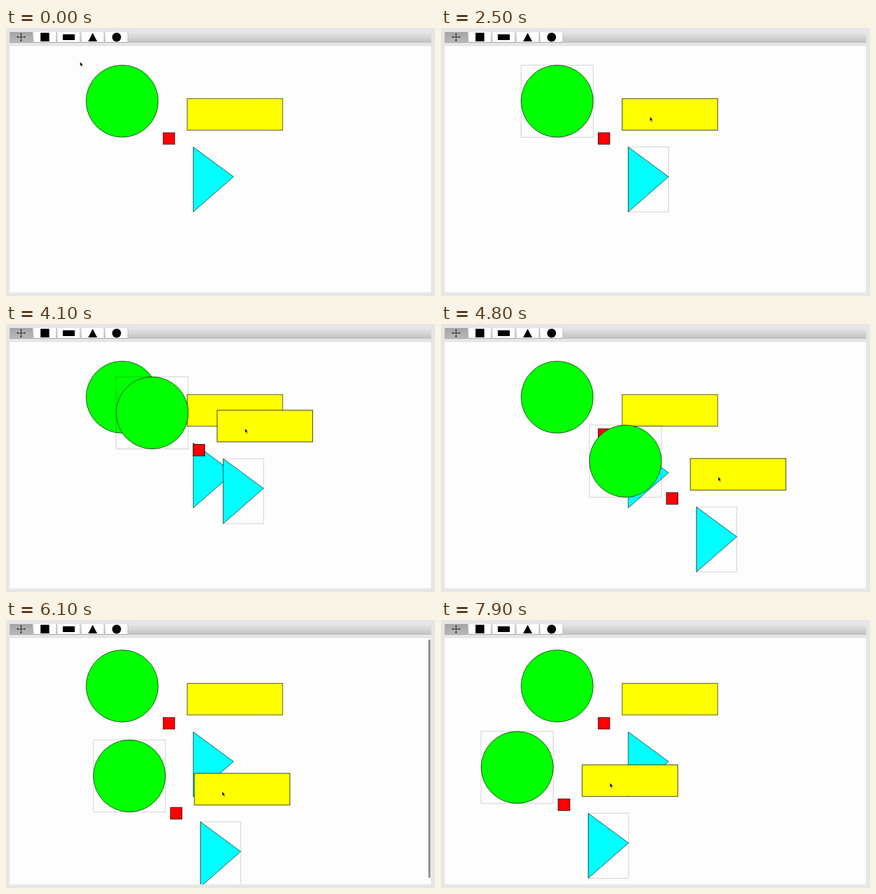
Recreate the animation shown at these times as an HTML page. Size 640 px wide and 400 px high, loop 8 s.

```html
<!DOCTYPE html>
<html lang="en">
<head>
<meta charset="utf-8">
<title>Shape editor</title>
<style>
  html, body { margin: 0; width: 100%; height: 100%; overflow: hidden; background: #e6e6e6; }
  svg { display: block; width: 640px; height: 400px; }
  .shape { stroke: #000; stroke-opacity: .75; stroke-width: .85; }
  .box { fill: none; stroke: #000; stroke-opacity: .2; stroke-width: .9; }
</style>
</head>
<body>
<svg viewBox="0 0 640 400">
  <defs>
    <linearGradient id="bar" x2="0" y2="1">
      <stop offset="0" stop-color="#e8e8e8"/>
      <stop offset="1" stop-color="#c0c0c0"/>
    </linearGradient>
    <linearGradient id="down" x2="0" y2="1">
      <stop offset="0" stop-color="#a4a4a4"/>
      <stop offset="1" stop-color="#b8b8b8"/>
    </linearGradient>
    <clipPath id="view"><rect x="5.5" y="27" width="628.5" height="367.5"/></clipPath>
  </defs>

  <rect width="640" height="400" fill="#e6e6e6"/>
  <rect x="5" y="5.5" width="629.5" height="16.5" fill="url(#bar)"/>
  <g id="buttons"></g>
  <path d="M16.5 13.5h12M22.5 8v12" stroke="#222" stroke-width=".9"/>
  <path d="M16 13.5l2-1.5v3zM29 13.5l-2-1.5v3zM22.5 7.5l-1.5 2h3zM22.5 20l-1.5-2h3z" fill="#222"/>
  <rect x="51.5" y="7.2" width="13" height="12.8"/>
  <rect x="84.8" y="9.4" width="17.8" height="8.6"/>
  <path d="M129.3 7.3l6.7 12.7h-13.4z"/>
  <circle cx="165" cy="13.7" r="6.7"/>

  <rect x="5.5" y="27" width="628.5" height="367.5" fill="#fdfdfd"/>
  <g clip-path="url(#view)">
    <g id="base"></g>
    <g id="copy"></g>
    <rect id="marquee" class="box"/>
    <rect id="thumb" x="630.2" y="29" width="3" height="356" rx="1.5" fill="#666"/>
  </g>
  <path id="cursor" d="M0 0V6.2L1.5 5L2.6 7.6L3.7 7.1L2.6 4.6H4.3Z" fill="#000" stroke="#fff" stroke-width=".3"/>
</svg>
<script>
const LOOP = 8000, STEP = 100, DROP_AT = 1600, GRAB_AT = 3100;
const ns = 'http://www.w3.org/2000/svg';
const $ = id => document.getElementById(id);

function set(el, attrs) {
  for (const k in attrs) el.setAttribute(k, attrs[k]);
  return el;
}
const add = (parent, tag, attrs) =>
  set(parent.appendChild(document.createElementNS(ns, tag)), attrs);
const bounds = (x, y, width, height) => ({ x, y, width, height });

for (let i = 0; i < 5; i++) {
  const x = 5.8 + i * 35.6;
  add($('buttons'), 'rect', { ...bounds(x, 6, 34, 16), fill: '#a4a4a4' });
  add($('buttons'), 'rect', { ...bounds(x, 6, 33.3, 15), fill: i ? '#fdfdfd' : 'url(#down)' });
}

const block = (fill, ...b) => ({ tag: 'rect', box: bounds(...b), attrs: { ...bounds(...b), fill } });
const shapes = [
  { tag: 'circle', box: bounds(119.5, 55.4, 107.6, 107.7), attrs: { cx: 173.3, cy: 109.2, r: 53.8, fill: '#0f0' } },
  block('#ff0', 270.2, 105.3, 142.6, 47.2),
  block('#f00', 234.4, 156.2, 17.4, 17.4),
  { tag: 'path', box: bounds(279.3, 177.6, 60.2, 97), attrs: { d: 'M279.3 177.6l60.2 44.4l-60.2 52.6z', fill: '#0ff' } }
];

// Adds every shape with its selection box and returns the boxes.
const build = layer => shapes.map(s => {
  add(layer, s.tag, { class: 'shape', ...s.attrs });
  return add(layer, 'rect', { class: 'box', ...s.box });
});
const boxes = build($('base'));
build($('copy'));

// Turning points of the pointer: time, x, y
const path = [
  [100, 110.5, 50.5], [1000, 408, 266], [1400, 368, 259], [1500, 368, 259],
  [2400, 311.7, 132.5], [GRAB_AT, 311.7, 132.5], [4100, 356.5, 155.9], [4800, 413.5, 228],
  [5500, 355.5, 259.7], [6700, 290.2, 249.3], [7200, 248.9, 241.8], [7300, 248.9, 241.8],
  [7500, 252.1, 243.3]
];

// Slope at a point, flat at the ends and where the direction turns.
function slope(i, axis) {
  const a = path[i - 1], b = path[i], c = path[i + 1];
  if (!a || !c || (b[axis] - a[axis]) * (c[axis] - b[axis]) <= 0) return 0;
  return (c[axis] - a[axis]) / (c[0] - a[0]);
}

function pointerAt(t) {
  const last = path.length - 1;
  const time = Math.min(Math.max(t, path[0][0]), path[last][0]);
  const i = Math.min(path.findLastIndex(p => p[0] <= time), last - 1);
  const a = path[i], b = path[i + 1], d = b[0] - a[0];
  const s = (time - a[0]) / d, r = 1 - s;
  return [1, 2].map(k =>
    a[k] + (b[k] - a[k]) * s * s * (3 - 2 * s) +
    d * s * r * (r * slope(i, k) - s * slope(i + 1, k)));
}

const ramp = (t, from, to) => Math.min(1, Math.max(0, (t - from) / (to - from)));
const show = (el, on) => set(el, { visibility: on ? 'visible' : 'hidden' });
const move = (el, x, y) => set(el, { transform: `translate(${x} ${y})` });

const [startX, startY] = pointerAt(0);
const [grabX, grabY] = pointerAt(GRAB_AT);

function draw(t) {
  const [x, y] = pointerAt(t);
  const selecting = t > 100 && t < DROP_AT;
  const copied = t > GRAB_AT;
  move($('cursor'), x, y);
  show($('marquee'), selecting);
  if (selecting) set($('marquee'), bounds(startX, startY, x - startX, y - startY));
  shapes.forEach(({ box }, i) => {
    const hit = x >= box.x && y >= box.y;
    show(boxes[i], !copied && (t >= DROP_AT || selecting && hit));
  });
  move($('base'), 0, -10.7 * ramp(t, 5200, 5400));
  move($('copy'), x - grabX, y - grabY);
  show($('copy'), copied);
  set($('thumb'), { opacity: ramp(t, 5200, 5300) - ramp(t, 6000, 6400) });
}

const start = performance.now();
function tick() {
  const t = (performance.now() - start) % LOOP;
  draw(Math.floor(t / STEP) * STEP);
  requestAnimationFrame(tick);
}
tick();
</script>
</body>
</html>
```
